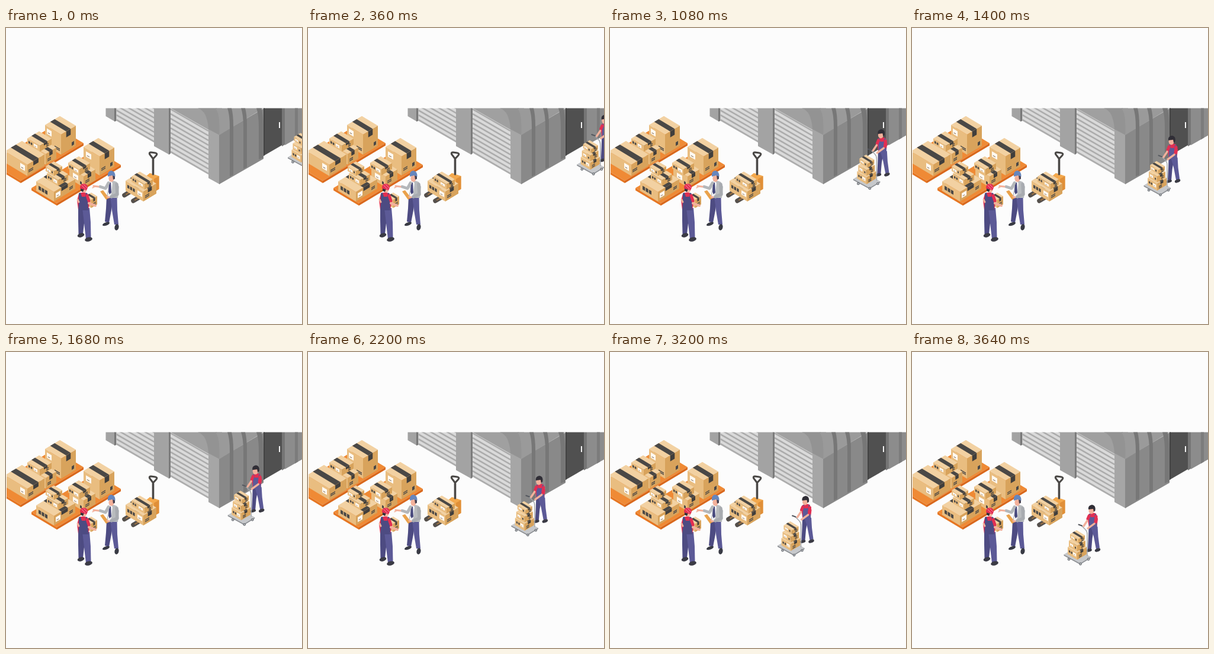
Recreate the animation shown at these times as an HTML page. Size 500 by 500 pixels, loop 6 s.

```html
<!DOCTYPE html>
<html lang="en">
<head>
<meta charset="utf-8">
<title>Warehouse delivery</title>
<style>
html, body { margin: 0; width: 100%; height: 100%; overflow: hidden; background: #fcfcfc; }
svg { display: block; width: 100%; height: 100%; }
</style>
</head>
<body>
<svg id="stage" viewBox="0 0 500 500"></svg>
<script>
const LOOP = 6000, STEP = 40, TRAVEL = 3640;
const K = 0.6, WALL = 0.577; // slopes of the cargo and of the building
const TOP = 135.5;           // the building is cut off here
const DARK = '#4a4846', NAVY = '#5c5a97', DEEP = '#4d4b82', RED = '#e32f52', SKIN = '#f3b19b';

const poly = (fill, pts) => `<polygon fill="${fill}" points="${pts}"/>`;
const path = (fill, d) => `<path fill="${fill}" d="${d}"/>`;
const line = (color, width, d) =>
  `<path fill="none" stroke="${color}" stroke-width="${width}" stroke-linecap="round" stroke-linejoin="round" d="${d}"/>`;
const rect = (fill, x, y, w, h) => `<rect fill="${fill}" x="${x}" y="${y}" width="${w}" height="${h}"/>`;
const oval = (fill, x, y, rx, ry = rx, turn = 0) =>
  `<ellipse fill="${fill}" rx="${rx}" ry="${ry}" transform="translate(${x} ${y}) rotate(${turn})"/>`;

// Printed details, in the coordinates of a box face
const label = (x, y, w, h) =>
  rect('#fffaf2', x, y, w, h) + rect('#8d7763', x + w * .2, y + h * .62, w * .45, h * .14);
const icons = (x, y, n, size = 3) =>
  Array.from({ length: n }, (_, i) => rect(DARK, x + i * (size + 1.2), y, size, size * 1.5)).join('');
const bars = (x, y, w) => rect(DARK, x, y, w, 1.6) + rect(DARK, x, y + 2.7, w, 1.6);

// (x, y) is the front bottom corner; w runs to the left, d to the right
function box(x, y, w, d, h, left = '', right = '') {
  const top = y - h, a = d * .35, b = d * .65;
  const onTop = (p, q) => [x - p + q, top - K * (p + q)];
  return poly('#f2d1a2', [onTop(0, 0), onTop(w, 0), onTop(w, d), onTop(0, d)]) +
    poly(DARK, [onTop(0, a), onTop(w, a), onTop(w, b), onTop(0, b)]) +
    `<g transform="matrix(1 ${K} 0 1 ${x - w} ${top - K * w})">${rect('#e9bd80', 0, 0, w, h)}${left}</g>` +
    `<g transform="matrix(1 ${-K} 0 1 ${x} ${top})">${rect('#d8a35c', 0, 0, d, h)}` +
    `${rect('#403e3c', a, 0, b - a, Math.min(10, h * .38))}${right}</g>`;
}

function pallet(x, y, w, d) {
  const t = 4, p = (a, b, z) => [x - a + b, y - K * (a + b) - z];
  return poly('#ef8a35', [p(0, 0, t), p(w, 0, t), p(w, d, t), p(0, d, t)]) +
    poly('#e67622', [p(0, 0, 0), p(w, 0, 0), p(w, 0, t), p(0, 0, t)]) +
    poly('#d9681c', [p(0, 0, 0), p(0, d, 0), p(0, d, t), p(0, 0, t)]);
}

// left and right: heights of the upper edge at both sides
function shutter(id, x, w, left, right, base) {
  const rise = WALL * w;
  let slats = '';
  for (let y = base - 2; y > TOP - rise; y -= 8) {
    slats += `<path stroke="#acacac" stroke-width="2.6" d="M${x} ${y}l${w} ${rise}"/>`;
  }
  return `<clipPath id="${id}">${poly('#000', [x, left, x + w, right, x + w, base + rise, x, base])}</clipPath>` +
    `<g clip-path="url(#${id})">${rect('#dadada', x, TOP, w, 130)}${slats}</g>`;
}

// A vertical rib of the side wall, bent over with the roof
const rib = (a, b, y) =>
  path('#777', `M${a - 4} ${TOP}H${b - 3}Q${b} 146 ${b} 166V${y - 2}L${a} ${y + 1}V168Q${a} 146 ${a - 4} ${TOP}Z`);

function warehouse() {
  return poly('#a3a3a3', `168.5,${TOP} 184,${TOP} 184,158 168.5,149`) +
    poly('#777', `183,${TOP} 186.5,${TOP} 186.5,157 183,158`) +
    shutter('gateA', 186.5, 64, TOP, TOP, 157) +
    poly('#a3a3a3', `250,${TOP} 276,${TOP} 276,214 250,199.5`) +
    poly('#7b7b7b', `275,${TOP} 278,${TOP} 278,212 275,214`) +
    poly('#a0a0a0', `278,${TOP} 365,${TOP} 365,185 342,172`) +
    shutter('gateB', 278, 64, TOP, 172, 211) +
    poly('#a6a6a6', '342,171 361,181 361,264 342,253.5') +
    path('#939393', `M324 ${TOP}H356Q361 143 361 181L342 171Q340 140 324 ${TOP}Z`) +
    poly('#898989', '360,180 435,136 435,221 360,264') +
    path('#9a9a9a', `M354 ${TOP}H435L360 181Q363 150 354 ${TOP}Z`) +
    rib(378, 384, 250) + rib(401, 407, 237) + rib(427, 434.5, 221) +
    poly('#505050', `435,${TOP} 466,${TOP} 466,198 435,216`) +
    poly('#424242', `435,${TOP} 437,${TOP} 437,215 435,216`) +
    rect('#f4f4f4', 461, 159, 2, 10) +
    poly('#757575', `466,${TOP} 471,${TOP} 471,197 466,200`) +
    poly('#8c8c8c', `471,${TOP} 500,${TOP} 500,181.5 471,198`) +
    poly('#7c7c7c', `488,${TOP} 493,${TOP} 493,185.5 488,188.5`);
}

function backStack() {
  return pallet(25, 262, 50, 106) +
    box(93, 214, 27, 25, 34, label(3, 4, 8, 9) + bars(16, 25, 9), icons(18, 24, 1, 4)) +
    box(67, 231, 22, 18, 18, label(9, 4, 7, 7), bars(3, 10, 6)) +
    box(57, 209, 21, 20, 10, icons(2, 3, 2, 2.6) + label(11, 2, 6, 5), bars(11, 4, 4)) +
    box(36, 250, 38, 29, 19, label(26, 4, 8, 9), bars(2, 10, 8));
}

function frontStack() {
  return pallet(86, 300, 43, 108) +
    box(158, 249, 27, 25, 32, label(4, 5, 9, 9), bars(3, 22, 7) + icons(18, 22, 1, 4)) +
    box(131, 269, 24, 20, 18, label(6, 4, 9, 8) + icons(18, 11, 1), bars(3, 9, 7)) +
    box(124, 249, 19, 18, 10, icons(2, 3, 2, 2.5) + label(10, 2, 7, 5), bars(9, 5, 5)) +
    box(81, 293, 30, 36, 16, icons(4, 5, 3, 4.2), label(3, 4, 8, 8) + bars(26, 8, 6)) +
    box(88, 267, 19, 17, 10, icons(2, 3, 2, 2.4) + label(11, 2, 6, 5), bars(9, 4, 5)) +
    box(81, 250, 14, 14, 8, label(2, 2, 6, 4) + icons(10, 2, 1, 2), bars(7, 3, 4));
}

function jack() {
  return poly('#f3a84d', '237,250 243,245 258.500,250 258.500,272 247,279 237,272') +
    poly('#e08f38', '250,255 258.500,250 258.500,272 250,277') +
    line(DARK, 3.6, 'M248.500 222V247') +
    line(DARK, 3, 'M248.500 221L242.500 213Q241.500 210 245 210L252 211Q256.500 212 254 215Z') +
    line('#55504c', 7.5, 'M200 282.500L222 269M215 292L237 279') +
    line('#a5743f', 1.8, 'M203 281L211 276M218 290.500L226 286') +
    box(232, 293, 30, 22, 17, icons(3, 5, 3, 3.4) + label(20, 4, 8, 7), bars(3, 9, 7)) +
    box(234, 273, 22, 14, 9, icons(2, 2, 2, 2.3) + label(12, 2, 7, 4), bars(7, 4, 4));
}

function loader() {
  return path(DEEP, 'M122 303H134L132 330L130 348H122.500L122 325Z') +
    path(NAVY, 'M129 304H141L143 328L143.500 355L135 356L132 330Z') +
    oval('#3b3b45', 126.5, 350, 6, 3.4, -18) + oval('#3b3b45', 139.5, 357, 6.5, 3.5, -14) +
    box(144, 304, 10, 10, 14, label(2, 3, 5, 4), bars(3, 8, 5)) +
    path(RED, 'M123 280Q130 275 138 280L142 291L139 307H122L120 291Z') +
    path(DEEP, 'M123 279L126 278L128 285H134L135 278L138 280L139 308H122L123 292Z') +
    line(RED, 5, 'M137 283L140 292') + line(SKIN, 4, 'M140 296L151 300') +
    line(SKIN, 3, 'M121 290L123 294') +
    oval(SKIN, 132, 273, 4.5, 5) + path('#35323b', 'M126 270L132 272L130 277L126 275Z') +
    path(RED, 'M125 270Q125 263 131 263Q138 263 138 270L136 274L125 271Z') +
    line('#f79aaa', .9, 'M128 266L134 272M131 264L137 270');
}

function manager() {
  return path(DEEP, 'M170 284H181L178 308L174 329L167 327L169 305Z') +
    path(NAVY, 'M176 284H187.500L188 308L190 332H183L179 308Z') +
    oval('#383a44', 169, 331, 6.3, 2.7, -20) + oval('#383a44', 187, 336.5, 3.5, 5.3, 12) +
    path('#b9bcbf', 'M171 260Q179 256 187 260L191 268L189 287H170L172 272Z') +
    path('#f4f4f6', 'M173 260L177 258L180 262L177 286H172Z') +
    path('#46487c', 'M174 261L177 261L178 278L175 281L173 277Z') +
    line('#b4b7ba', 5, 'M173 262L168 271L159 268') +
    line(SKIN, 3.2, 'M156 268L148 267') + line(SKIN, 1.4, 'M150 268L146 270') +
    poly('#eaa24b', '159,276 164,274 174,287 169,290') +
    line('#a8abb0', 5.5, 'M187 264L188 281L178 285') + line(SKIN, 3, 'M174 286L171 285') +
    oval(SKIN, 178, 254, 4.6, 6) + path('#464150', 'M180 249H184V255L181 256Z') +
    path('#6686bd', 'M172 249Q172 241 178 241Q185 242 184.500 251L179 249L172 251Z');
}

function courier() {
  const wheel = (x, y) => oval('#777b81', x, y, 2.4) + oval('#d8d8d8', x, y, .9);
  return path(DEEP, 'M298.500 295H308L304.500 315L303 333H297L298 312Z') +
    path(NAVY, 'M302 295H313.500L314.500 312L317 331L311 333L307 312Z') +
    oval('#3a3a44', 299, 335, 5, 2.5, -15) + oval('#3a3a44', 313.5, 334.5, 5, 2.7, -22) +
    path(RED, 'M298 274Q305 270 311 273L314 282L312 297H299L297 284Z') +
    path(NAVY, 'M299 274L301 273L302 279H308L309 273L311 274L313 298H299Z') +
    oval(SKIN, 303, 268, 4.5, 5.5) +
    path('#302e36', 'M298 266Q297 259 304 258Q311 259 309.500 268L307 270L306 265Z') +
    // trolley
    poly('#c6c8cb', '256.500,342 275,331 302,346 284,357') +
    poly('#898c91', '256.500,342 284,357 302,346 302,348 284,359 256.500,344') +
    wheel(265, 350) + wheel(284.5, 358) + wheel(298, 350) +
    box(279, 351, 16, 16, 12, icons(2, 4, 2, 2.3) + label(9, 3, 5, 5), bars(3, 6, 5)) +
    box(279, 337, 14, 14, 10, label(2, 3, 5, 4) + icons(10, 4, 1, 2), bars(7, 4, 4)) +
    box(281, 323, 14, 11, 7, label(2, 2, 5, 3) + icons(9, 2, 1, 2), bars(5, 3, 4)) +
    line('#a4a7ab', 1.5, 'M296 344V308Q296 303 293 300L286 293') +
    line('#55585f', 2, 'M281.500 291.500L287 293.500') +
    // arms
    line(RED, 5, 'M299 277L297 282') + line(SKIN, 3.4, 'M296 285L290 294') +
    line(RED, 5, 'M311 278L310 287') + line(SKIN, 3.4, 'M308 290L297 298');
}

const stage = document.getElementById('stage');
stage.innerHTML = `<clipPath id="room"><rect x="1" width="499" height="500"/></clipPath>
  ${rect('#fcfcfc', 0, 0, 500, 500)}
  <g clip-path="url(#room)">${warehouse()}${backStack()}${frontStack()}${jack()}${manager()}${loader()}
  <g id="courier">${courier()}</g></g>`;
const mover = document.getElementById('courier');

// The courier walks in at a constant speed, 25 poses a second, then stands
function draw(ms) {
  const t = Math.floor((ms % LOOP) / STEP) * STEP;
  const left = Math.max(0, TRAVEL - t);
  mover.setAttribute('transform', `translate(${(left * .0603).toFixed(2)} ${(-left * .034).toFixed(2)})`);
}

let start;
function tick(now) {
  start ??= now;
  draw(now - start);
  requestAnimationFrame(tick);
}
draw(0);
requestAnimationFrame(tick);
</script>
</body>
</html>
```
